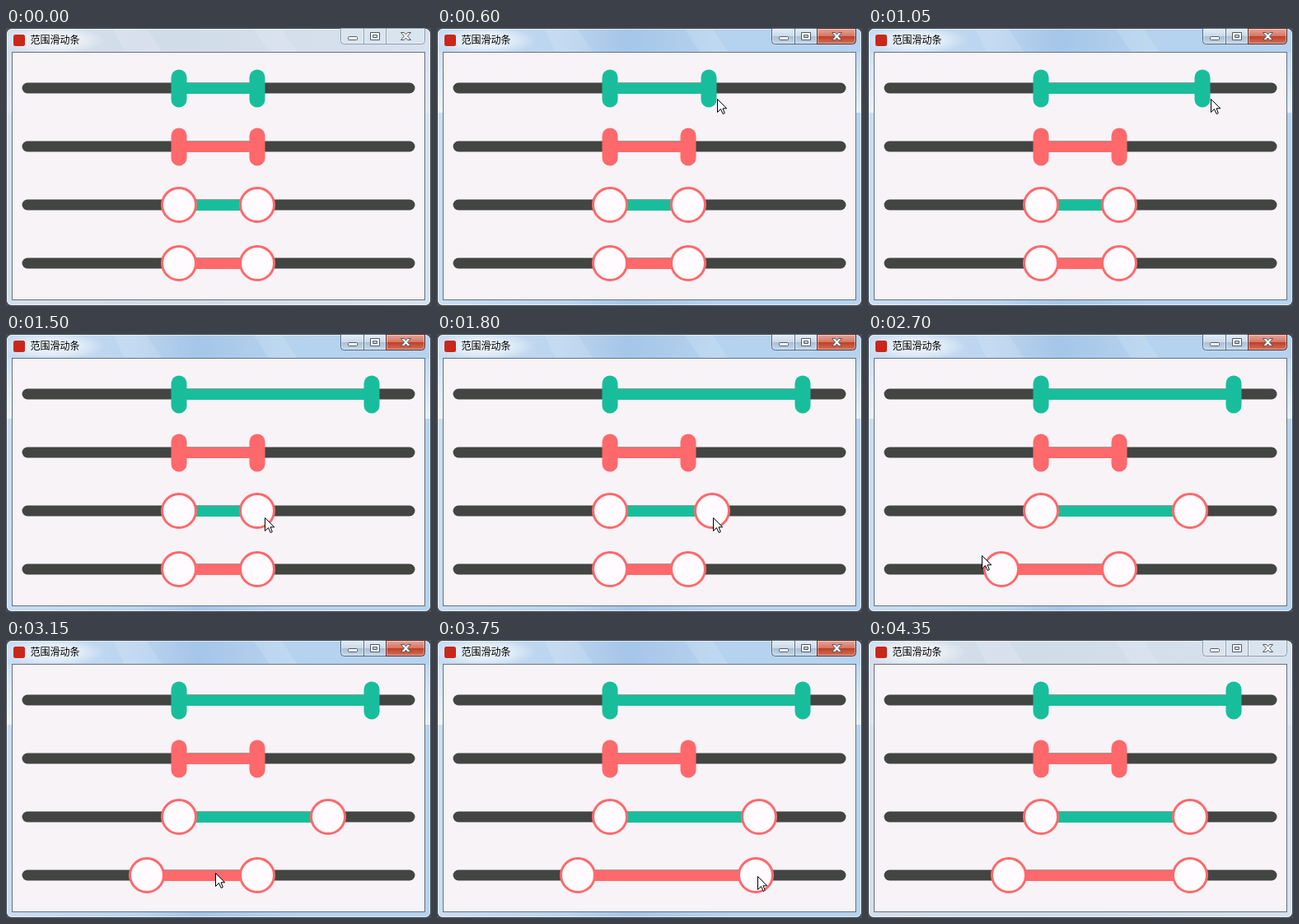
Recreate the animation shown at these times as an HTML page. Size 516x338 px, loop 4500 ms.

```html
<!DOCTYPE html>
<html lang="zh">
<head>
<meta charset="utf-8">
<style>
  html, body { margin: 0; width: 100%; height: 100%; overflow: hidden; background: #4a4f55; }
  svg { display: block; width: 516px; height: 338px; }
  text { font: 12px "Noto Sans CJK SC", "Noto Sans CJK", sans-serif; }
  #window { --glass: url(#glassOff); --face: #d9e4ef; --close: #d9e4ef; --line: #8f9bab; --closeLine: #8f9bab; --shine: .3; }
  #window.active { --glass: url(#glassOn); --face: url(#buttonFace); --close: url(#closeFace); --line: #59697d; --closeLine: #5b2a2c; --shine: 1; }
  #glass { fill: var(--glass); }
  #shine { opacity: var(--shine); }
  #buttonBase { fill: var(--face); stroke: var(--line); }
  #closeBase { fill: var(--close); stroke: var(--closeLine); }
  #divider { stroke: var(--line); }
</style>
</head>
<body>
<svg viewBox="0 0 516 338">
  <defs>
    <linearGradient id="glassOn">
      <stop offset="0" stop-color="#c9ddf2"/><stop offset=".3" stop-color="#bbd5ef"/>
      <stop offset=".45" stop-color="#a5c6e8"/><stop offset=".65" stop-color="#b5d2ee"/>
      <stop offset="1" stop-color="#b5d3ef"/>
    </linearGradient>
    <linearGradient id="glassOff">
      <stop offset="0" stop-color="#d5dfeb"/><stop offset=".4" stop-color="#d1dce9"/>
      <stop offset="1" stop-color="#d8e2ee"/>
    </linearGradient>
    <linearGradient id="sideShine" x2="0" y2="1">
      <stop offset="0" stop-color="#fff" stop-opacity=".15"/><stop offset="1" stop-color="#fff" stop-opacity=".65"/>
    </linearGradient>
    <linearGradient id="buttonFace" x2="0" y2="1">
      <stop offset="0" stop-color="#e3edf7"/><stop offset=".48" stop-color="#cbdaea"/>
      <stop offset=".5" stop-color="#a9bfd6"/><stop offset="1" stop-color="#c5d9ec"/>
    </linearGradient>
    <linearGradient id="closeFace" x2="0" y2="1">
      <stop offset="0" stop-color="#e8a89a"/><stop offset=".48" stop-color="#d47866"/>
      <stop offset=".5" stop-color="#bd3d25"/><stop offset="1" stop-color="#d5745a"/>
    </linearGradient>
    <radialGradient id="titleGlow">
      <stop offset="0" stop-color="#fff" stop-opacity=".75"/><stop offset=".55" stop-color="#fff" stop-opacity=".5"/>
      <stop offset="1" stop-color="#fff" stop-opacity="0"/>
    </radialGradient>
    <clipPath id="windowClip"><rect x="1" y="1" width="514" height="336" rx="6"/></clipPath>
  </defs>

  <g id="window">
    <rect width="516" height="338" rx="7" fill="#454b52"/>
    <g clip-path="url(#windowClip)">
      <rect id="glass" width="516" height="338"/>
      <path d="M130 0h40l20 30h-46zM300 0h34l20 30h-34z" fill="#fff" opacity=".12"/>
      <path id="shine" d="M1 30h7v73H1zM508 30h7v73h-7z" fill="url(#sideShine)"/>
      <ellipse cx="58" cy="15" rx="62" ry="17" fill="url(#titleGlow)"/>
    </g>
    <rect x="1.5" y="1.5" width="513" height="335" rx="5.5" fill="none" stroke="#fff" stroke-opacity=".6"/>
    <rect x="9" y="8" width="14" height="14" rx="2.5" fill="#c9271b"/>
    <text x="29.5" y="19">范围滑动条</text>

    <path id="buttonBase" d="M406.5 .5H461.5V19.5H410.5Q406.5 19.5 406.5 15.5Z"/>
    <path id="closeBase" d="M461.5 .5H508.5V15.5Q508.5 19.5 504.5 19.5H461.5Z"/>
    <path id="divider" d="M434.5 1V19"/>
    <path d="M407.5 1.5H433.5V18.5H411Q407.5 18.5 407.5 15ZM435.5 1.5H460.5V18.5H435.5ZM462.5 1.5H507.5V15Q507.5 18.5 504 18.5H462.5Z"
          fill="none" stroke="#fff" stroke-opacity=".4"/>
    <g fill="#fff" stroke="#535b68">
      <rect x="415.5" y="10.5" width="11" height="4" rx="1"/>
      <path fill-rule="evenodd" d="M442.5 5.5h11v9h-11zM445.5 8.5h5v3h-5z"/>
      <path d="M479.5 5.5h4l2 2.5 2-2.5h4l-4 4.5 4 4.5h-4l-2-2.5-2 2.5h-4l4-4.5z"/>
    </g>
    <rect x="7.5" y="29.5" width="501" height="301" fill="#f7f3f7" stroke="#66717f"/>
  </g>
  <g id="sliders"></g>
  <path id="cursor" d="M.5 .5V16.5L4.5 12.5L7.2 18.5L9.3 17.5L7 11.8H11.7Z" fill="#fff" stroke="#000"/>
</svg>
<script>
const STEP = 150, LOOP = 4500;
const TEAL = "#18be9c", RED = "#ff696b";
const HOME = [210, 305];
const $ = id => document.getElementById(id);

function set(node, attrs) {
  for (const key in attrs) node.setAttribute(key, attrs[key]);
}
function add(tag, attrs) {
  const node = document.createElementNS("http://www.w3.org/2000/svg", tag);
  set(node, attrs);
  return $("sliders").appendChild(node);
}

function makeSlider(y, color, round) {
  add("rect", { x: 19.5, y: y - 6.5, width: 477, height: 13, rx: 6.5, fill: "#424542" });
  const range = add("rect", { y: y - 6, height: 13, fill: color });
  const handles = HOME.map(() => round
    ? add("circle", { cy: y, r: 20.5, fill: "#fffbff", stroke: RED, "stroke-width": 3 })
    : add("rect", { x: -9.5, y: y - 22.5, width: 19, height: 46, rx: 9.5, fill: color }));
  return ends => {
    set(range, { x: ends[0], width: ends[1] - ends[0] });
    handles.forEach((handle, i) => set(handle, { transform: `translate(${ends[i]} 0)` }));
  };
}

const sliders = [0, 1, 2, 3].map(i => makeSlider(73 + 71 * i, i % 2 ? RED : TEAL, i > 1));

// Pointer way points: time, x, y
const path = [
  [150, 420, 240], [450, 315, 86], [1050, 416, 86], [1200, 454, 86],
  [1500, 314, 223], [1650, 306, 223], [2100, 392, 223],
  [2400, 186, 280], [2700, 138, 269], [2850, 147, 275],
  [3300, 307, 287], [3750, 389, 287], [3900, 393, 287]
];

// A held handle keeps its distance (grab) from the pointer.
const drags = [
  { slider: 0, end: 1, press: 450, release: 1200, grab: 10 },
  { slider: 2, end: 1, press: 1650, release: 2100, grab: 1 },
  { slider: 3, end: 0, press: 2400, release: 2850, grab: -24 },
  { slider: 3, end: 1, press: 3300, release: 3900, grab: 2 }
];

function pointerAt(time) {
  const next = Math.max(1, path.findIndex(([t]) => t >= time));
  const [t0, x0, y0] = path[next - 1], [t1, x1, y1] = path[next];
  const p = (time - t0) / (t1 - t0);
  return [x0 + (x1 - x0) * p, y0 + (y1 - y0) * p].map(Math.round);
}

function draw() {
  const time = Math.floor(performance.now() % LOOP / STEP) * STEP;
  const ends = sliders.map(() => [...HOME]);
  for (const { slider, end, press, release, grab } of drags) {
    if (time >= press) ends[slider][end] = pointerAt(Math.min(time, release))[0] - grab;
  }
  sliders.forEach((place, i) => place(ends[i]));

  $("window").classList.toggle("active", time >= 450 && time < 4350);
  const shown = time >= path[0][0] && time <= path.at(-1)[0];
  set($("cursor"), { visibility: shown ? "visible" : "hidden" });
  if (shown) set($("cursor"), { transform: `translate(${pointerAt(time)})` });
  requestAnimationFrame(draw);
}
draw();
</script>
</body>
</html>
```
